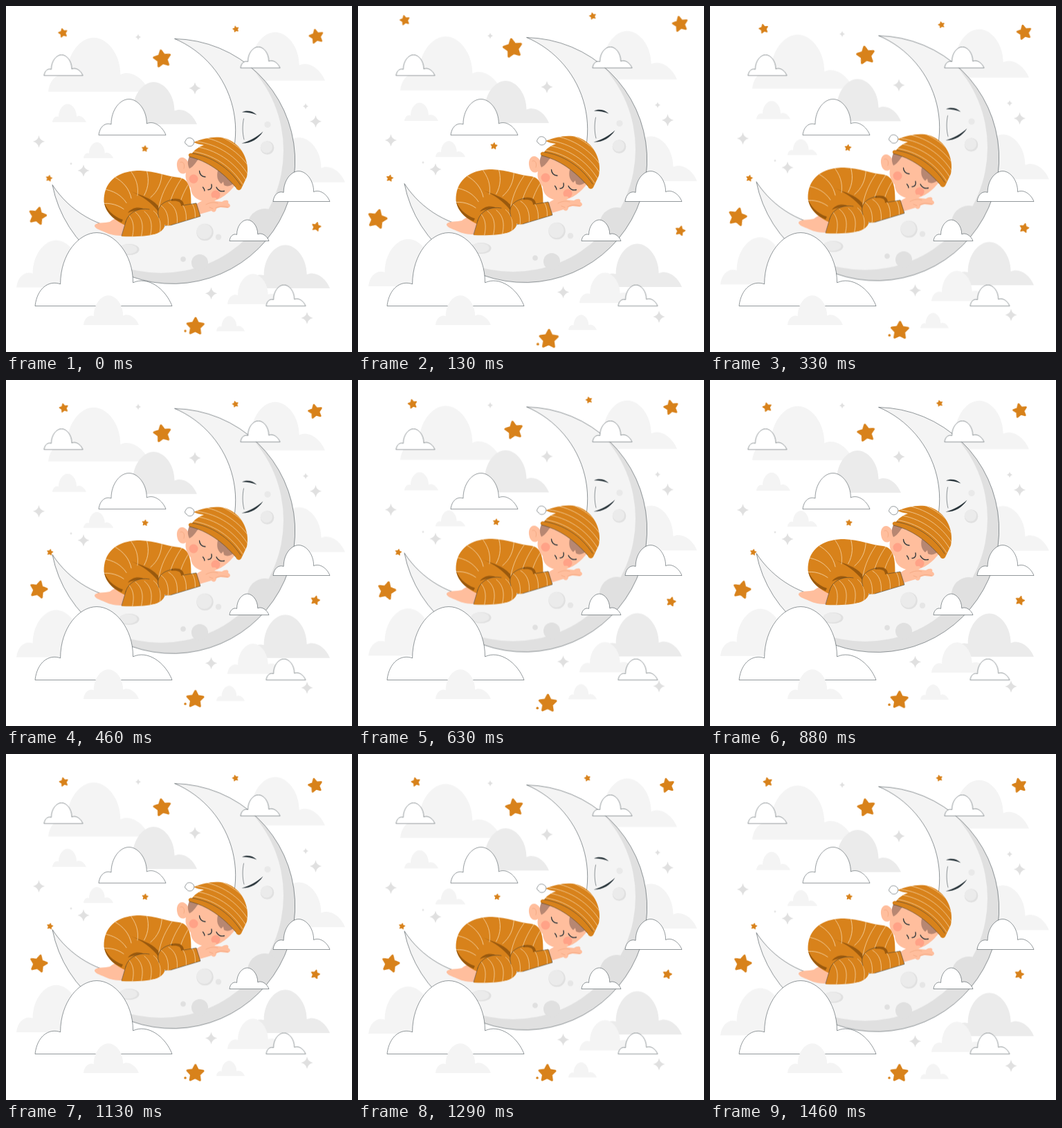
An HTML page for the animation above (1500 ms loop, 500 by 500 pixels).

```html
<!DOCTYPE html>
<html lang="en">
<head>
<meta charset="utf-8">
<title>Sleeping on the moon</title>
<style>
  html, body { margin: 0; width: 100%; height: 100%; overflow: hidden; background: #fff; }
  svg { display: block; width: 100%; height: 100%; }
  .line { fill: none; stroke: #263238; stroke-width: .5; stroke-linecap: round; }
  .pink { stroke: #eb996f; }
  .bold { fill: #263238; }
  .stripe { fill: none; stroke: #f6d5a6; stroke-width: .8; stroke-linecap: round; }
  .cloth { fill: #d8821b; }
  .fold { fill: #99590e; }
  .skin { fill: #ffbe9d; }
  .blush { fill: #ffa287; }
  .hair { fill: #b78772; }
  .puff { fill: #fff; stroke: #263238; stroke-width: .5; stroke-linejoin: round; vector-effect: non-scaling-stroke; }
  #stars { fill: #d8821b; stroke: #d8821b; stroke-linejoin: round; transform-origin: 250px 250px; }
</style>
</head>
<body>
<svg viewBox="0 0 500 500">
  <defs>
    <path id="moon" d="M244 47.5A177 177 0 1 1 67 258.500A144 144 0 1 0 244 47.5Z"/>
    <path id="body" d="M170 316C150 306 139 291 142 274C146 248 168 238 194 238C216 239 236 247 250 248C263 250 268 261 267.500 287L243 312L196 326Z"/>
    <path id="leg" d="M167 333L173 312C177 298 192 291 207 294C222 297 230 308 229 319C224 331 205 334 167 333Z"/>
    <path id="arm" d="M221 306C216 292 225 283 240 280C253 278 258 284 258 288L275 285L281 304L238 317C230 319 224 315 221 306Z"/>
    <path id="hat" d="M271 197C291 189 312 186 327 196C345 207 352 230 348 247L340 264C337 268 333 266 332 262C313 240 291 224 265 218C262 215 265 212 269 213C272 208 280 203 286 201C280 200 275 199 271 197Z"/>
    <clipPath id="inMoon"><use href="#moon"/></clipPath>
    <clipPath id="inBody"><use href="#body"/></clipPath>
    <clipPath id="inLeg"><use href="#leg"/></clipPath>
    <clipPath id="inArm"><use href="#arm"/></clipPath>
    <clipPath id="inHat"><use href="#hat"/></clipPath>
  </defs>

  <g id="float">
    <g id="haze"></g>
    <g id="sparkles" fill="#e0e0e0"></g>

    <use href="#moon" fill="#e0e0e0"/>
    <g clip-path="url(#inMoon)">
      <circle cx="224" cy="209" r="177" fill="#f4f4f4"/>
      <g fill="#e0e0e0">
        <circle cx="374" cy="318" r="25"/>
        <circle cx="280" cy="371" r="12"/>
        <circle cx="256" cy="366" r="3.8"/>
        <ellipse cx="178" cy="352" rx="14.5" ry="8"/>
        <circle cx="287.5" cy="327" r="12.2"/>
        <circle cx="377.5" cy="205" r="9.8"/>
        <circle cx="378" cy="171.5" r="4.6" fill="#e9e9e9"/>
        <circle cx="307" cy="334" r="4.2" fill="#e6e6e6"/>
      </g>
      <g fill="#ebebeb">
        <ellipse cx="176.5" cy="351.5" rx="13" ry="7"/>
        <circle cx="286.5" cy="326" r="11"/>
        <circle cx="376.5" cy="204" r="8.6"/>
      </g>
    </g>
    <use href="#moon" class="line"/>
    <path class="bold" d="M341 153.500C347 150.500 356 151 362.500 157.500C356 155 349 153.500 341 153.500ZM340.500 198.500C352 195.500 362 190 371.500 181.500C364 193 353 199 340.500 198.500Z"/>
    <path class="line" d="M343.500 163C341.500 172 341.500 184 344 193"/>

    <path class="skin" d="M174 310C165 304 157 306 150 312C143 314 131 312 128 317C127 321 136 324 143 327C151 331 159 332 168 332Z"/>
    <use href="#body" class="cloth"/>
    <g clip-path="url(#inBody)">
      <path class="fold" d="M141 281C145 294 154 304 169 309L167 313L140 300ZM176 299C182 291 193 289 202 295C192 294 183 296 176 299ZM181 268C194 274 208 276 220 289L220 297C210 284 197 275 181 268Z"/>
      <g id="bodyStripes"></g>
    </g>
    <use href="#leg" class="cloth"/>
    <g id="legStripes" clip-path="url(#inLeg)"></g>
    <path class="line" d="M173 312C177 298 192 291 207 294M173 312L167 332"/>

    <path class="skin" d="M263 225C256 214 246 219 247 231C248 241 254 245 260 241C258 249 262 257 267 263C267 274 276 281 288 283C306 284 321 272 330 260L332 248L283 216Z"/>
    <path class="line pink" d="M252 226C256 224 259 229 257 235"/>
    <path class="hair" d="M266 216L279 221C274 225 273 231 265 235C262 229 262 222 266 216ZM306 238C304 247 306 253 311 257L314 254L315 259C320 262 326 260 330 255L334 262L335 252Z"/>
    <circle class="blush" cx="271" cy="250" r="6.5"/>
    <circle class="blush" cx="303" cy="273" r="6.5"/>
    <path class="line" stroke-width="1.3" style="stroke-width:1.3" d="M279.5 238.500C279.500 243 283 247 288 247M304 262C305.500 266 310 269 315.500 267.500M297 258C298 262 296.500 266 292 265.500M284.500 262C285.500 263 286.500 264.500 287 267"/>

    <path class="skin" d="M274 287C282 282 290 277 301 277C305 277 305 280 301 282L312 283C318 279 323 281 321 285C326 288 324 291 320 292L310 291C307 292 305 292 304 293C304 298 299 299 297 296L280 301Z"/>
    <path class="line pink" d="M289 287C295 284 299 283 306 285M303 292C308 289 314 289 321 291M294 291L299 293"/>
    <use href="#arm" class="cloth"/>
    <g id="armStripes" clip-path="url(#inArm)"></g>
    <path class="fold" d="M239 279C249 277 257 280 257 288L253 289C253 283 248 281 239 282Z"/>
    <path class="line" d="M240 280C225 283 216 292 221 306M257 288L275 285L281 304L238 317"/>

    <use href="#hat" class="cloth"/>
    <g clip-path="url(#inHat)">
      <g id="hatStripes"></g>
      <path class="line" d="M269 213C296 217 322 233 339 259"/>
    </g>
    <path class="line" d="M265 218C291 224 313 240 332 262"/>
    <path class="puff" d="M260 194C261 190 267 190 269 192C273 194 272 199 270 201C267 204 262 203 261 200C258 199 258 196 260 194Z"/>
  </g>

  <g id="front"></g>
  <g id="stars"></g>
</svg>
<script>
const $ = id => document.getElementById(id);

function add(parent, tag, attrs) {
  const el = document.createElementNS('http://www.w3.org/2000/svg', tag);
  for (const key in attrs) el.setAttribute(key, attrs[key]);
  $(parent).append(el);
}

// every cloud is one shape, 100 wide, placed by its lower left corner
const cloudShape = 'M0 0C1.5 -13 10 -19 18.5 -16C18.500 -38 32 -53.500 45 -53.500' +
  'S71.500 -38 71.500 -17C82 -22 95 -13 100 0Z';

const cloud = (parent, look) => ([x, y, width]) => add(parent, 'path', {
  ...look, d: cloudShape, transform: `translate(${x} ${y}) scale(${width / 100})`
});

const light = { fill: '#f4f4f4' }, dark = { fill: '#ebebeb' };
[[61, 124, 146], [330, 108, 131], [369, 255, 121], [15, 407, 128],
 [67, 168, 49], [112, 220, 43], [304, 470, 41]].forEach(cloud('haze', light));
[[162, 171, 114], [351, 408, 117]].forEach(cloud('haze', dark));
cloud('haze', light)([320, 431, 82]);

[[55, 101, 56], [134, 187, 97], [339, 90, 57], [386, 283, 82],
 [323, 340, 57], [376, 434, 57], [42, 434, 198]]
  .forEach(([x, y, width]) => cloud('front', { class: 'puff' })([x, y - .5, width]));
cloud('front', light)([112, 461, 80]);

function sparkle(r, x, y) {
  const q = r * .17;
  add('sparkles', 'path', {
    d: `M0 ${-r}Q${q} ${-q} ${r} 0Q${q} ${q} 0 ${r}Q${-q} ${q} ${-r} 0Q${-q} ${-q} 0 ${-r}`,
    transform: `translate(${x} ${y})`
  });
}
[[273, 119], [447.5, 167], [47.5, 196], [112, 238], [296.5, 415.5], [435, 451]]
  .forEach(p => sparkle(8.7, ...p));
[[191, 45], [433, 145]].forEach(p => sparkle(4.5, ...p));
sparkle(2, 94, 228);

function star(r, x, y) {
  const points = Array.from({ length: 10 }, (_, i) => {
    const a = i * Math.PI / 5, d = r * (i % 2 ? .45 : .88);
    return [d * Math.sin(a), -d * Math.cos(a)].map(n => n.toFixed(2));
  });
  const tilt = -14 * Math.cos(y / 100);
  add('stars', 'polygon', {
    points: points.join(' '), 'stroke-width': r * .24,
    transform: `translate(${x} ${y}) rotate(${tilt})`
  });
}
[[226, 77.5], [47, 303], [273.5, 461.5]].forEach(p => star(13.5, ...p));
[[447, 45.5]].forEach(p => star(11, ...p));
[[83.5, 40.5], [447, 318.5]].forEach(p => star(7, ...p));
[[331.5, 35], [201, 206.5], [63.5, 249]].forEach(p => star(4.8, ...p));
add('stars', 'circle', { cx: 259, cy: 468, r: 1.7, stroke: 'none' });

// repeats one curve with a transform that depends on its index
function stripes(parent, d, count, place) {
  for (let i = 0; i < count; i++)
    add(parent, 'path', { class: 'stripe', d, transform: place(i) });
}
stripes('bodyStripes', 'M190 274C192 260 188 248 178 236', 6, i => `rotate(${i * 21 - 63} 196 300)`);
stripes('bodyStripes', 'M240 247C231 260 224 274 221 291', 3, i => `translate(${i * 14} ${i * 2})`);
stripes('legStripes', 'M174 299C185 308 186 320 182 336', 4, i => `translate(${i * 13} ${-i})`);
stripes('armStripes', 'M222 287C232 293 236 304 234 320', 4, i => `translate(${i * 13} ${-i * 3})`);
stripes('hatStripes', 'M268 210C299 214 326 232 342 258', 5, i => `translate(${i * 4} ${-i * 7})`);

const loop = { duration: 1500, iterations: Infinity, delay: -11 };

$('float').animate(
  [0, -10, 0].map(y => ({ transform: `translateY(${y}px)` })), loop);

// double heartbeat about the middle of the stage
$('stars').animate(
  [[0, 1], [.1, 1.1], [.3, 1], [.4, 1], [.5, 1.1], [.6, 1], [1, 1]]
    .map(([offset, s]) => ({ offset, transform: `scale(${s})` })), loop);
</script>
</body>
</html>
```
